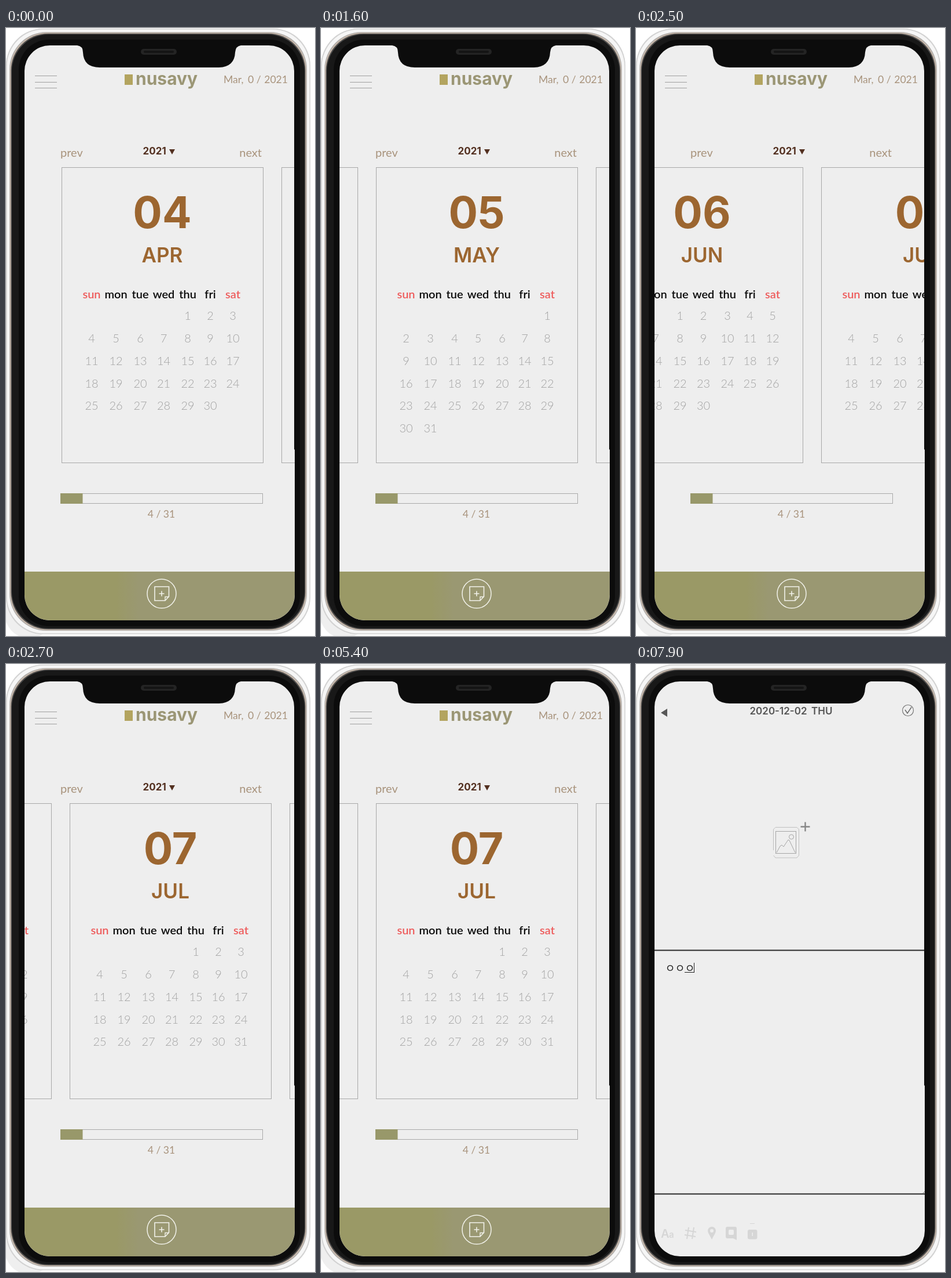
Animation, 534 px wide and 1048 px high, one loop 8 s. Source, as an HTML page with a canvas:

```html
<!DOCTYPE html>
<html lang="en">
<head>
<meta charset="utf-8">
<title>Calendar diary</title>
<style>
html, body { margin: 0; width: 100%; height: 100%; overflow: hidden; background: #fff; }
canvas { display: block; width: 534px; height: 1048px; }
</style>
</head>
<body>
<canvas id="stage"></canvas>
<script>
const W = 534, H = 1048, LOOP = 8000, STEP = 100;
const canvas = document.getElementById('stage');
const ctx = canvas.getContext('2d');
const scale = window.devicePixelRatio || 1;
canvas.width = W * scale;
canvas.height = H * scale;

const LATO = 'Lato, sans-serif';
const INTER = 'Inter, sans-serif';
const HANGUL = '"Noto Sans CJK KR", "Noto Sans CJK", sans-serif';
const PAPER = '#eeeeee', OLIVE = '#9a9966', BROWN = '#9c6630', TAN = '#a8937c';

const MONTHS = ['JAN', 'FEB', 'MAR', 'APR', 'MAY', 'JUN', 'JUL', 'AUG', 'SEP'];
const WEEKDAYS = ['sun', 'mon', 'tue', 'wed', 'thu', 'fri', 'sat'];
const COLUMNS = [52, 94, 136, 176.5, 218, 257, 296];
const FIRST_MONTH = 3, CARD_LEFT = 95.9, CARD_PITCH = 380, CARD_DRIFT = .45;

const SLIDE_STARTS = [1200, 1850, 2400], SLIDE_TIME = 400;
// [time, hovered day of July], 0 = none
const HOVERS = [[3200, 5], [3400, 0], [3500, 6], [3900, 7], [4000, 8], [4100, 9], [4200, 10],
  [4300, 17], [4400, 16], [4500, 23], [4600, 29], [4700, 28], [4800, 0]];
const EDITOR_AT = 5700, FOCUS_AT = 7000;
const TYPED = [[7500, 1], [7800, 2], [7900, 3]];

function latest(list, t) {
  let value = 0;
  for (const [at, v] of list) if (t >= at) value = v;
  return value;
}

// CSS "ease": cubic-bezier(.25, .1, .25, 1)
function ease(x) {
  if (x <= 0) return 0;
  if (x >= 1) return 1;
  const curve = (a, b, u) => 3 * a * u * (1 - u) ** 2 + 3 * b * u * u * (1 - u) + u ** 3;
  let lo = 0, hi = 1;
  for (let i = 0; i < 24; i++) {
    const mid = (lo + hi) / 2;
    if (curve(.25, .25, mid) < x) lo = mid; else hi = mid;
  }
  return curve(.1, 1, lo);
}

function text(str, x, y, font, color, align = 'left') {
  ctx.font = font;
  ctx.fillStyle = color;
  ctx.textAlign = align;
  ctx.fillText(str, x, y);
}

function trace(points, close) {
  ctx.beginPath();
  points.forEach(([x, y], i) => i ? ctx.lineTo(x, y) : ctx.moveTo(x, y));
  if (close) ctx.closePath();
}

function line(points, color, width = 1, close = false) {
  trace(points, close);
  ctx.strokeStyle = color;
  ctx.lineWidth = width;
  ctx.stroke();
}

function polygon(points, color) {
  trace(points, true);
  ctx.fillStyle = color;
  ctx.fill();
}

function ring(x, y, r, color, width = 1) {
  ctx.beginPath();
  ctx.arc(x, y, r, 0, Math.PI * 2);
  ctx.strokeStyle = color;
  ctx.lineWidth = width;
  ctx.stroke();
}

function box(x, y, w, h, color) {
  ctx.strokeStyle = color;
  ctx.lineWidth = 1;
  ctx.strokeRect(x + .5, y + .5, w - 1, h - 1);
}

function fill(x, y, w, h, color) {
  ctx.fillStyle = color;
  ctx.fillRect(x, y, w, h);
}

function round(x, y, w, h, r, color) {
  ctx.beginPath();
  ctx.roundRect(x, y, w, h, r);
  ctx.fillStyle = color;
  ctx.fill();
}

function plus(x, y, r, color, width) {
  line([[x - r, y], [x + r, y]], color, width);
  line([[x, y - r], [x, y + r]], color, width);
}

function drawPhone() {
  const shells = [[0, '#d2d2d2'], [1.5, '#f6f6f6'], [6, '#b4b0ac'], [7.5, '#d3bfae'],
    [8.5, '#505050'], [10, '#181818']];
  for (const [inset, color] of shells)
    round(inset, 1 + inset, 526 - 2 * inset, 1044 - 2 * inset, 64, color);
  round(22, 20, 486, 1011, 52, '#0c0c0c');
}

function screenPath() {
  ctx.beginPath();
  ctx.moveTo(76, 30);
  ctx.lineTo(123, 30);
  ctx.quadraticCurveTo(133, 31, 133, 42);
  ctx.quadraticCurveTo(134, 68, 162, 68);
  ctx.lineTo(368, 68);
  ctx.quadraticCurveTo(395, 67, 396, 42);
  ctx.quadraticCurveTo(397, 31, 406, 30);
  ctx.lineTo(454, 30);
  ctx.arcTo(498, 30, 498, 74, 44);
  ctx.lineTo(498, 726);
  ctx.lineTo(499, 727);
  ctx.arcTo(499, 1021, 455, 1021, 44);
  ctx.arcTo(32, 1021, 32, 977, 44);
  ctx.arcTo(32, 30, 76, 30, 44);
  ctx.closePath();
}

function drawSpeaker() {
  round(233, 36, 62, 10, 5, '#242424');
  round(238, 39, 52, 4, 2, '#151515');
}

function drawCard(x, month, hovered) {
  box(x, 240, 349, 510, '#a8a8a8');
  text('0' + (month + 1), x + 174, 345, `700 75px ${INTER}`, BROWN, 'center');
  text(MONTHS[month], x + 174, 404, `600 35px ${INTER}`, BROWN, 'center');
  WEEKDAYS.forEach((name, i) => {
    const color = i % 6 ? '#0a0a0a' : '#ee5b5b';
    text(name, x + COLUMNS[i], 466, `600 20px ${LATO}`, color, 'center');
  });
  const offset = new Date(2021, month, 1).getDay();
  const days = new Date(2021, month + 1, 0).getDate();
  for (let day = 1; day <= days; day++) {
    const cell = day + offset - 1;
    const y = Math.round(503.3 + 38.75 * Math.floor(cell / 7));
    const active = day === hovered;
    text(day, x + COLUMNS[cell % 7], y, `${active ? 400 : 300} 20px ${LATO}`,
      active ? '#000' : '#a2a2a2', 'center');
  }
}

function drawHeader() {
  for (const y of [82.5, 93.5, 103.5]) line([[50, y], [88, y]], '#a0a0a0');
  fill(205, 80, 14, 18, '#b3a45f');
  text('nusavy', 224, 98, `700 30px ${INTER}`, '#9b9675');
  const font = `400 17.6px ${LATO}`;
  text('Mar,', 376, 95, font, TAN);
  text('0 /', 418, 95, font, TAN);
  text('2021', 487, 95, font, TAN, 'right');
  text('prev', 94, 222, `400 20px ${LATO}`, TAN);
  text('next', 442, 222, `400 20px ${LATO}`, TAN, 'right');
  text('2021', 236.5, 217.5, `700 17px ${INTER}`, '#533020');
  polygon([[282, 209], [292, 209], [287, 218]], '#533020');
}

function drawFooter() {
  box(94, 802, 350, 18, '#a9a9a9');
  fill(94, 802, 38.5, 18, '#98986a');
  text('4 / 31', 268.5, 844, `400 17.5px ${LATO}`, TAN, 'center');

  const band = ctx.createLinearGradient(190, 0, 230, 0);
  band.addColorStop(0, OLIVE);
  band.addColorStop(1, '#9a9872');
  fill(32, 937, 468, 85, band);
  ring(269, 975, 25, '#f2f2ea', 1.5);
  line([[257, 963], [281.5, 963], [281.5, 980], [275, 987], [257, 987]], '#f2f2ea', 1.6, true);
  line([[281.5, 980.5], [275, 980.5], [275, 987]], '#f2f2ea', 1.4);
  plus(269, 975, 4.5, '#f2f2ea', 1.6);
}

function drawCalendar(t) {
  const position = SLIDE_STARTS.reduce((sum, s) => sum + ease((t - s) / SLIDE_TIME), 0);
  const hovered = latest(HOVERS, t);
  drawHeader();
  for (let i = 0; i < 5; i++) {
    const x = Math.round(CARD_LEFT + CARD_PITCH * (i - position) - CARD_DRIFT * position);
    if (x > -350 && x < W) drawCard(x, FIRST_MONTH + i, i === 3 ? hovered : 0);
  }
  drawFooter();
}

function drawPictureButton() {
  line([[237.5, 321], [237.5, 285], [241, 281.5], [278, 281.5], [281.5, 285], [281.5, 330],
    [278, 334], [241, 334], [237.5, 330]], '#c0c0c0');
  box(241, 288, 36, 39, '#a5a5a5');
  line([[243, 325], [249, 314], [252, 312], [255, 315], [263, 303], [265, 304], [275, 325]], '#a5a5a5');
  ring(268.5, 298, 4, '#a5a5a5');
  plus(292.5, 280.5, 8, '#868686', 2.4);
}

function drawToolbar() {
  const ink = '#d6d6d6';
  text('A', 43, 989, `600 20px ${INTER}`, ink);
  text('a', 57, 989, `600 15px ${INTER}`, ink);
  line([[91, 971], [88, 991]], ink, 2);
  line([[100, 971], [97, 991]], ink, 2);
  line([[85, 976], [104, 979]], ink, 2);
  line([[84, 984], [103, 987]], ink, 2);

  ctx.beginPath();
  ctx.arc(131, 977, 7, Math.PI * .85, Math.PI * 2.15);
  ctx.lineTo(131, 992);
  ctx.closePath();
  ctx.fillStyle = ink;
  ctx.fill();
  round(128, 974, 6, 6, 3, PAPER);

  round(155, 970, 19, 20, 3, ink);
  polygon([[166, 989], [174, 986], [174, 993]], ink);
  round(160, 975, 9, 9, 2, PAPER);
  round(193, 975, 16.5, 16.5, 3, ink);
  fill(200.5, 980, 1.5, 6, PAPER);
  line([[197, 964.5], [205, 964.5]], ink);
}

function drawEntry(t) {
  const font = `300 18.5px ${HANGUL}`;
  const count = latest(TYPED, t);
  if (t >= FOCUS_AT) {
    fill(32, 492.5, 468, 2, '#2a2a2a');
    fill(32, 912.5, 468, 2, '#2a2a2a');
  }
  if (!count) {
    text('내용을 입력하세요', 50, 530.5, font, '#c6c6c6');
    if (t >= FOCUS_AT) fill(50, 515, 1, 17, '#222');
    return;
  }
  const end = 50 + 17 * count;
  text('ㅇ'.repeat(count), 50.5, 530.5, font, '#222');
  fill(end - 17, 531, 16, 1, '#222');
  if (t >= 7600) fill(end - 1, 515, 1, 17, '#222');
}

function drawEditor(t) {
  polygon([[43, 84], [54, 77], [54, 91]], '#575757');
  text('2020-12-02', 196.5, 86.5, `600 17px ${INTER}`, '#555');
  text('THU', 339.5, 86.5, `600 17px ${INTER}`, '#555', 'right');
  ring(470, 80, 9.5, '#777', 1.2);
  line([[465, 79], [469, 85], [476, 74.5]], '#666', 1.4);
  drawPictureButton();
  drawEntry(t);
  line([[495, 913], [500, 908.5]], '#777');
  drawToolbar();
}

function draw(t) {
  ctx.setTransform(scale, 0, 0, scale, 0, 0);
  fill(0, 0, W, H, '#fff');
  const editing = t >= EDITOR_AT;
  if (!editing) round(-2, 968, 84, 84, 42, '#efefef');
  drawPhone();
  ctx.save();
  screenPath();
  ctx.fillStyle = PAPER;
  ctx.fill();
  ctx.clip();
  if (editing) drawEditor(t); else drawCalendar(t);
  ctx.restore();
  drawSpeaker();
}

const start = performance.now();
function tick() {
  const elapsed = (performance.now() - start) % LOOP;
  draw(Math.floor(elapsed / STEP) * STEP);
  requestAnimationFrame(tick);
}
tick();
</script>
</body>
</html>
```
